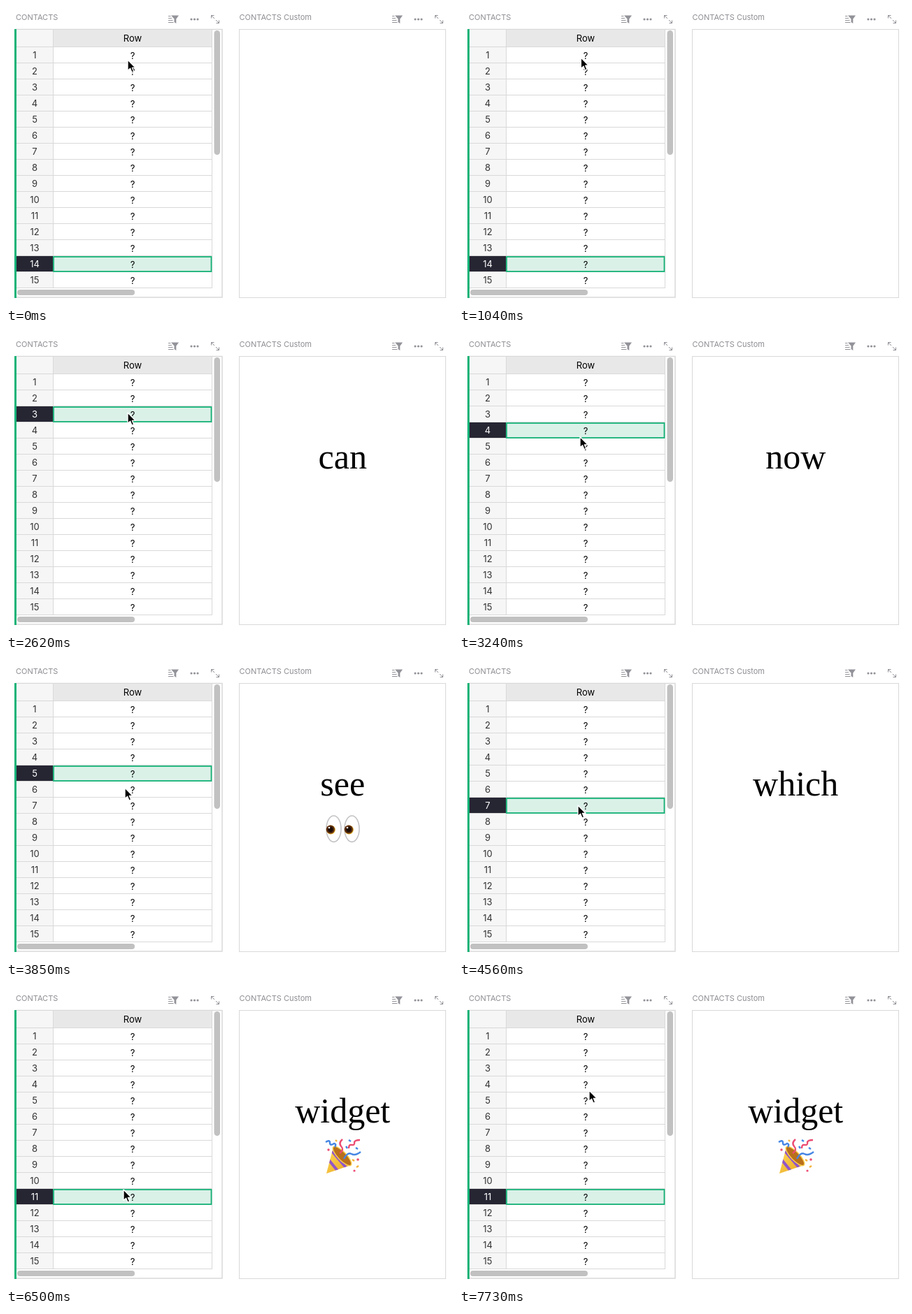
Animation of 639x428 px, one loop 8 s. Source, as an HTML page:

```html
<!DOCTYPE html>
<html lang="en">
<head>
<meta charset="utf-8">
<title>Contacts table with custom widget</title>
<style>
  html, body { margin: 0; width: 100%; height: 100%; overflow: hidden; background: #fff; }
  svg { display: block; width: 639px; height: 428px; }
  text { font: 13px Inter, sans-serif; text-anchor: middle; }
  .title { font-size: 11px; text-anchor: start; fill: #8e8e94; }
  .word { font: 50px "Liberation Serif", serif; }
  .line { fill: #d9d9d9; }
  .thumb { fill: #c1c1c1; }
</style>
</head>
<body>
<svg viewBox="0 0 639 428">
  <defs>
    <linearGradient id="skin" x2="0" y2="1">
      <stop stop-color="#ffd04a"/><stop offset="1" stop-color="#f2a622"/>
    </linearGradient>
    <linearGradient id="gold" x2="1" y2="1">
      <stop stop-color="#ffdf5a"/><stop offset="1" stop-color="#e9a01f"/>
    </linearGradient>
    <clipPath id="cone"><path d="M468 229 493 255 458 267Z"/></clipPath>
    <g id="tools" fill="none" stroke="#929299">
      <path d="M232 14.5h3.500M232 17.500h5M232 20.500h6.500M232 23.500h7.500" stroke-width="1.200"/>
      <path d="M236 13.500h11l-3.700 5v6.500l-2.800-2v-4.500Z" fill="#929299" stroke="none"/>
      <g fill="#929299" stroke="none">
        <circle cx="265" cy="19" r="1.600"/><circle cx="269.500" cy="19" r="1.600"/><circle cx="274" cy="19" r="1.600"/>
      </g>
      <path d="M293.500 17.500v-4h4M293.500 13.500l4.500 4.500M304.500 20.500v4h-4M304.500 24.500l-4.500-4.500"/>
    </g>
    <g id="eye">
      <ellipse cx="468.500" cy="241.700" rx="10.500" ry="18.700" fill="#fff" stroke="#c3c3c6" stroke-width="1.600"/>
      <circle cx="464.300" cy="243" r="6.500" fill="#d7a11c"/>
      <circle cx="463.800" cy="242.500" r="6" fill="#5b2c10"/>
      <circle cx="463.800" cy="242.500" r="3.700" fill="#1c0d06"/>
      <circle cx="462" cy="240" r="1.300" fill="#fff"/>
    </g>
  </defs>

  <text class="title" x="14" y="20">CONTACTS</text>
  <text class="title" x="333.500" y="20">CONTACTS Custom</text>
  <use href="#tools"/><use href="#tools" x="320"/>

  <path d="M13 33.500H309V417H13" fill="none" stroke="#d9d9d9" stroke-width="1.500"/>
  <rect x="333.500" y="33.500" width="295" height="384" fill="#fff" stroke="#d9d9d9"/>
  <rect x="12" y="33" width="3" height="385" fill="#16b378"/>
  <rect x="15" y="34" width="52" height="369" fill="#f6f6f6"/>
  <rect x="68" y="34" width="226" height="24" fill="#e8e8e8"/>
  <rect class="line" x="67" y="34" width="1" height="369"/>
  <rect class="line" x="294" y="34" width="1" height="369"/>
  <rect class="line" x="15" y="58" width="280" height="1"/>
  <text x="181" y="51">Row</text>
  <g id="rows"></g>
  <g id="selection">
    <rect x="15" width="52" height="22" fill="#262633"/>
    <rect x="68" y="1" width="225.500" height="21" fill="#daf1e8" stroke="#16b378" stroke-width="1.800"/>
    <text id="selectedNumber" x="41" y="15.500" fill="#fff"></text>
    <text x="181" y="16.500">?</text>
  </g>
  <rect class="thumb" x="297.500" y="35" width="8.500" height="178" rx="4.200"/>
  <rect class="thumb" x="16" y="406" width="168" height="8" rx="4"/>

  <text id="word" class="word" x="481.200"></text>
  <g id="emoji1">
    <path d="M425 175 400 177q-4 3 0 6.500L421 186q-1 8 6 13 12 4 18-4 3-9 0-20-5-8-13-8-8 0-14 7Z" fill="url(#skin)"/>
    <path d="M400 183.500 424 186q7-1 5 5 5 2 2 7M420 187q6-4 9 2M423 193q6-3 8 2M417 175q6 3 13-1l6 1" fill="none" stroke="#d48618" stroke-width="1.200"/>
  </g>
  <g id="emoji5"><use href="#eye"/><use href="#eye" x="26"/></g>
  <g id="emoji11" fill="none" stroke-width="2.400">
    <path d="M468 229 493 255 458 267Z" fill="url(#gold)"/>
    <path d="M461 247 478 268M466 235 489 262" clip-path="url(#cone)" stroke="#9256c8" stroke-width="4"/>
    <ellipse cx="480.500" cy="242" rx="18" ry="6" transform="rotate(46 480.500 242)" fill="#b96f1b" stroke="#f8cd4c" stroke-width="1.500"/>
    <path d="M457 222q6-4 6 1t6 1q4 1 1 5M483 246q5-10 11-7 5 3 13-3" stroke="#4686e4"/>
    <path d="M477 238q7-5 2-10-4-5 2-10M490 231q0-6 4-5 5 1 4-4 1-3 8-3" stroke="#ec4c72"/>
    <g fill="#ec4c72" stroke="none">
      <circle cx="461" cy="233" r="1.700"/><circle cx="503" cy="247" r="1.800"/><circle cx="498" cy="263" r="1.600"/>
    </g>
    <path d="M490 219l3 2M486 228l2 3M500 230l3 2" stroke="#4686e4"/>
    <path d="M471 219l2 2M504 256l-3 2M495 247l3 2" stroke="#f3b53b"/>
  </g>

  <rect id="splitter" class="line" x="320" y="1" width="3" height="425"/>
  <path id="arrow" d="M0 0V15.500L3.600 12.300 6 18 8.700 16.900 6.300 11.300H11Z" stroke="#fff" stroke-width="1.300" stroke-linejoin="round"/>
  <path id="resize" d="M-8 0-3.500-4.500V-1.500H3.500V-4.500L8 0 3.500 4.500V1.500H-3.500V4.500Z" stroke="#fff"/>
</svg>
<script>
const LOOP = 8000, ROW_HEIGHT = 23, FIRST_ROW = 59;
const words = ["", "Look", "you", "can", "now", "see", "things", "which", "matter", "for", "your", "widget"];

// Pointer moves: start, end, steps, x, y and the row clicked at the start, if any
const moves = [
  [80, 170, 2, 172, 69],
  [430, 690, 4, 175, 83],
  [870, 1210, 5, 174, 69],
  [1380, 1730, 5, 174, 92, 1],
  [2180, 2440, 4, 174, 114, 2],
  [2620, 2880, 4, 174, 137, 3],
  [3060, 3410, 5, 172, 160, 4],
  [3590, 3850, 4, 170, 183, 5],
  [4120, 4380, 4, 170, 208, 6],
  [4560, 4910, 5, 168, 231, 7],
  [5080, 5440, 5, 167, 253, 8],
  [5610, 5880, 4, 167, 272, 9],
  [6060, 6410, 5, 168, 290, 10],
  [6500, 6590, 2, 168, 292, 11],
  [6770, 7030, 4, 321, 220],
  [7470, 7730, 4, 186, 148]
];

const el = id => document.getElementById(id);
const show = (id, on) => el(id).style.display = on ? "" : "none";
const rowTop = row => FIRST_ROW + (row - 1) * ROW_HEIGHT;

for (let row = 1; row <= 15; row++) {
  const y = rowTop(row);
  el("rows").innerHTML += `
    <rect class="line" x="15" y="${y + 22}" width="280" height="1"/>
    <text x="41" y="${y + 15.5}" fill="#333">${row}</text>
    <text x="181" y="${y + 16.5}">?</text>`;
}

function stateAt(t) {
  let x = 174, y = 77, row = 14;
  for (const [start, end, steps, toX, toY, clicked] of moves) {
    if (t < start) break;
    const step = Math.min(steps - 1, Math.floor((t - start) / (end - start) * (steps - 1) + 0.01));
    // A click takes the first step, so the pointer only moves after it
    const p = clicked ? step / (steps - 1) : (step + 1) / steps;
    const eased = p * p * (3 - 2 * p);
    x += (toX - x) * eased;
    y += (toY - y) * eased;
    row = clicked || row;
  }
  return { x, y, row };
}

function draw() {
  const { x, y, row } = stateAt(performance.now() % LOOP);
  const overSplitter = x > 312;

  el("selection").setAttribute("transform", `translate(0 ${rowTop(row)})`);
  el("selectedNumber").textContent = row;

  const word = el("word");
  word.textContent = words[row] || "";
  word.setAttribute("x", row === 1 ? 512 : 481.2);
  word.setAttribute("y", row === 1 ? 202 : 194);
  for (const n of [1, 5, 11]) show("emoji" + n, row === n);

  show("splitter", overSplitter);
  show("arrow", !overSplitter);
  show("resize", overSplitter);
  for (const id of ["arrow", "resize"]) el(id).setAttribute("transform", `translate(${x} ${y})`);
  requestAnimationFrame(draw);
}
draw();
</script>
</body>
</html>
```
